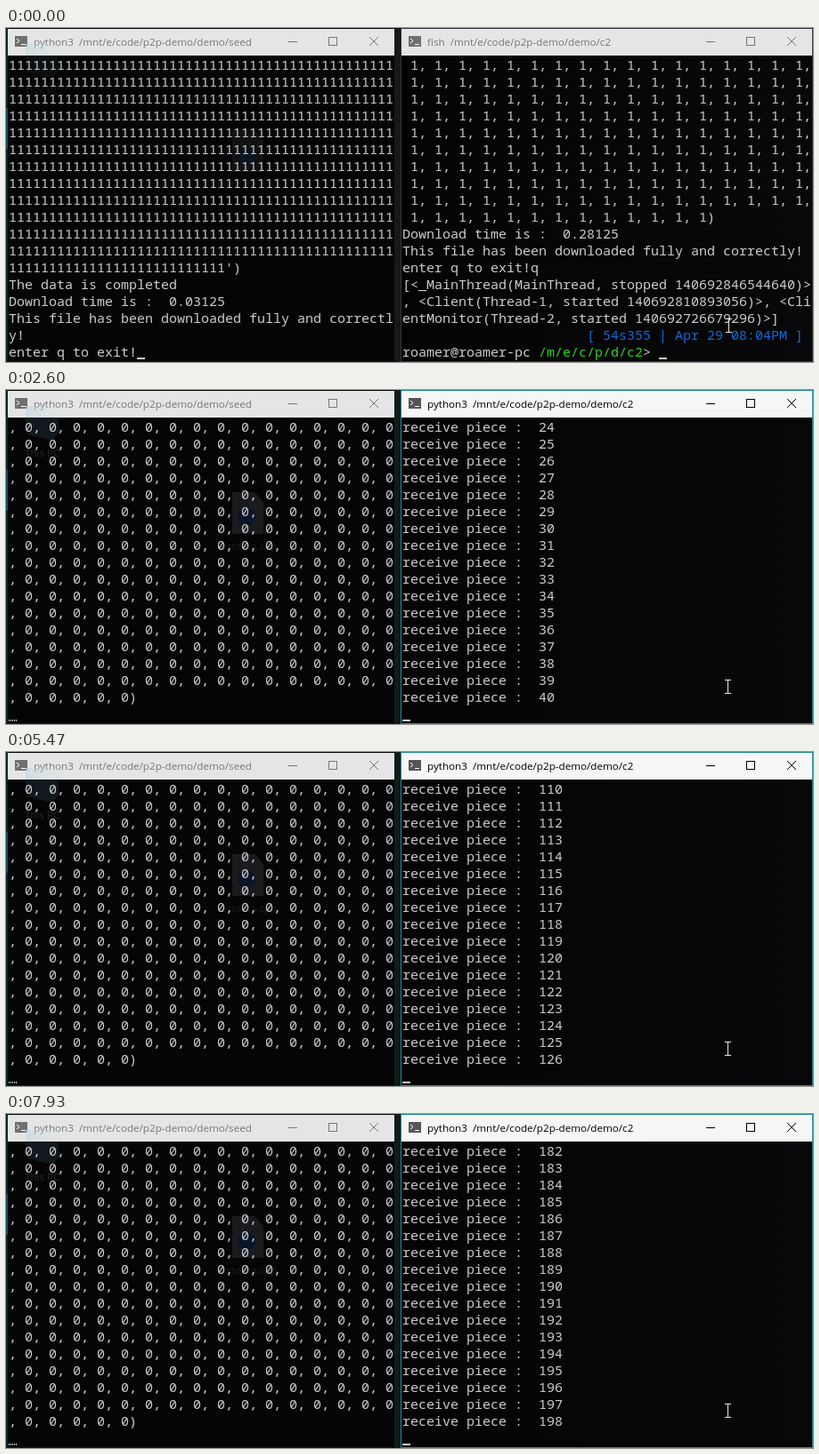
Recreate the animation shown at these times as an HTML page with a canvas. Size 906 px wide and 376 px high, loop 8 s.

```html
<!DOCTYPE html>
<html lang="en">
<head>
<meta charset="utf-8">
<title>Terminals</title>
<style>
html, body { margin: 0; width: 100%; height: 100%; overflow: hidden; background: #050505; }
canvas { display: block; }
</style>
</head>
<body>
<canvas id="stage" width="906" height="376"></canvas>
<script>
const ctx = document.getElementById('stage').getContext('2d');
const LOOP = 8000, TICK = 200 / 3, CELL = 9, ROW = 19, ROWS = 18, TOP = 31;
const MONO = '15px "Noto Sans Mono", "DejaVu Sans Mono", monospace';
const SANS = '11.65px "Open Sans", "Noto Sans", sans-serif';
const GREY = '#cccccc', BLUE = '#0f6bd8', GREEN = '#2ad41c', CYAN = '#00afff';
const LEFT_X = 3, RIGHT_X = 445;

const repeat = (line, n) => Array(n).fill(line);

// A line is a string, or a list of [text, colour] runs.
const seedDone = [
  ...repeat('1'.repeat(48), 12),
  '1'.repeat(27) + "')",
  'The data is completed',
  'Download time is :  0.03125',
  'This file has been downloaded fully and correctl',
  'y!',
  'enter q to exit!'
];
const seedSending = [...repeat(', 0'.repeat(16), 16), ', 0'.repeat(5) + ')', ''];

const ones = [...repeat(' 1,'.repeat(17), 17), ' 1,'.repeat(12) + ' 1)'];
const history = [
  ...ones,
  'Download time is :  0.28125',
  'This file has been downloaded fully and correctly!',
  'enter q to exit!q',
  '[<_MainThread(MainThread, stopped 140692846544640)>',
  ', <Client(Thread-1, started 140692810893056)>, <Cli',
  'entMonitor(Thread-2, started 140692726679296)>]',
  [[' '.repeat(23) + '[ 54s355 | Apr 29 08:04PM ]', BLUE]]
];
const prompt = [['roamer@roamer-pc ', GREY], ['/m/e/c/p/d/c2', GREEN], ['> ', GREY]];

function command(lit) {
  const arg = lit ? CYAN : GREY;
  return [
    [...prompt, ['python3', lit ? BLUE : GREY], [' ../../main.', arg]],
    [['py --port 8002 --seed 1', arg]]
  ];
}

// [tick, number of "receive piece" lines printed]
const progress = [[22, 0], [26, 9], [39, 41], [56, 85], [72, 109], [93, 148], [119, 200]];

function printed(tick) {
  if (tick === 61 || tick === 113) tick--;   // short stalls
  const i = Math.max(1, progress.findIndex(p => p[0] >= tick));
  const [t0, n0] = progress[i - 1], [t1, n1] = progress[i];
  return Math.round(n0 + (n1 - n0) * (tick - t0) / (t1 - t0));
}

// Piece 78 arrives twice.
const piece = i => 'receive piece :  ' + (i > 78 ? i - 1 : i);

function clientLines(tick) {
  if (tick < 6) return [...history, prompt];
  if (tick < 20) return [...history, ...command(tick > 6)];
  if (tick < 22) return [...history, ...command(true), ''];
  const pieces = Array.from({ length: printed(tick) }, (_, i) => piece(i));
  return [...ones, ...pieces, ''];
}

function rect(x, y, w, h, fill) {
  ctx.fillStyle = fill;
  ctx.fillRect(x, y, w, h);
}

function text(str, x, y, font, fill) {
  ctx.font = font;
  ctx.fillStyle = fill;
  ctx.fillText(str, x, y);
}

function path(points, stroke) {
  ctx.strokeStyle = stroke;
  ctx.lineWidth = 1;
  ctx.beginPath();
  points.forEach(([x, y], i) => i % 2 ? ctx.lineTo(x, y) : ctx.moveTo(x, y));
  ctx.stroke();
}

function polygon(points, fill) {
  ctx.fillStyle = fill;
  ctx.beginPath();
  points.forEach(p => ctx.lineTo(...p));
  ctx.fill();
}

function gradient(x0, x1, from, to) {
  const g = ctx.createLinearGradient(x0, 0, x1, 0);
  g.addColorStop(0, from);
  g.addColorStop(1, to);
  return g;
}

function lines(all, x) {
  all.slice(-ROWS).forEach((line, row) => {
    let col = 0;
    for (const [str, fill] of Array.isArray(line) ? line : [[line, GREY]]) {
      text(str, x + col * CELL, TOP + row * ROW + 16, MONO, fill);
      col += str.length;
    }
  });
}

function cursor(x, all, dotted) {
  const last = all[all.length - 1];
  const length = Array.isArray(last) ? last.reduce((n, run) => n + run[0].length, 0) : last.length;
  const left = x + length * CELL;
  if (!dotted) return rect(left, 371, CELL, 2, GREY);
  for (let i = 0; i < CELL; i += 2) rect(left + i, 371, 1, 2, GREY);
}

function titleBar(x, w, title, active) {
  const ink = active ? '#000' : '#777';
  rect(x, 1, w, 30, active ? '#f6f6f6' : '#e5e5e5');
  rect(x + 8, 9, 14, 12, active ? '#555' : '#707070');
  path([[x + 10, 12], [x + 13, 14.5], [x + 13, 14.5], [x + 10, 17], [x + 15, 18.5], [x + 20, 18.5]], '#fff');
  text(title, x + 29, 20, SANS, ink);
  const b = x + w - 119;
  path([[b, 15.5], [b + 10, 15.5]], ink);
  ctx.strokeRect(b + 45.5, 10.5, 9, 9);
  path([[b + 91, 10], [b + 101, 20], [b + 101, 10], [b + 91, 20]], ink);
}

// Desktop icons showing faintly through the left window
function ghosts(alpha) {
  ctx.globalAlpha = alpha;
  polygon([[21, 31], [58, 31], [60, 48], [52, 57], [24, 50]], '#10191d');
  text('This PC', 21, 75, SANS, '#26292d');
  polygon([[254, 115], [279, 115], [289, 126], [289, 162], [254, 162]], '#191b1e');
  ctx.fillStyle = '#08152a';
  ctx.beginPath();
  ctx.arc(270, 143, 10, 0, 7);
  ctx.fill();
  text('testdata.cpp', 237, 180, SANS, '#1c1e21');
  ctx.globalAlpha = 1;
}

function pointer(x, y) {
  const end = y + 15;
  path([[x - 3, y], [x + 4, y], [x + .5, y], [x + .5, end], [x - 3, end], [x + 4, end]], '#e8e8e8');
}

function draw(ms) {
  const tick = Math.min(119, Math.floor((ms % LOOP + 4) / TICK));
  const focused = tick >= 2, running = tick >= 22;

  rect(0, 0, 906, 376, '#15191b');
  rect(0, 0, 2, 376, '#0c2529');
  rect(0, 90, 2, 46, '#12555c');
  rect(2, 0, 434, 375, '#050505');
  rect(443, 0, 463, 376, focused ? '#1f8a92' : '#30363a');
  rect(444, 1, 461, 374, gradient(444, 905, '#040404', '#08080a'));

  ghosts(focused ? 1 : .6);
  titleBar(2, 434, 'python3  /mnt/e/code/p2p-demo/demo/seed', false);
  rect(22, 18, 42, 13, gradient(22, 64, 'rgba(190,215,222,.6)', 'rgba(215,224,226,.1)'));
  titleBar(444, 461, (tick < 20 ? 'fish' : 'python3') + '  /mnt/e/code/p2p-demo/demo/c2', focused);

  const seed = running ? seedSending : seedDone;
  const client = clientLines(tick);
  lines(seed, LEFT_X);
  lines(client, RIGHT_X);
  cursor(LEFT_X, seed, running);
  if (tick < 14 || tick >= 20) cursor(RIGHT_X, client, false);
  pointer(focused ? 810 : 811, focused ? 326.5 : 327.5);
}

function frame() {
  draw(performance.now());
  requestAnimationFrame(frame);
}
frame();
</script>
</body>
</html>
```
